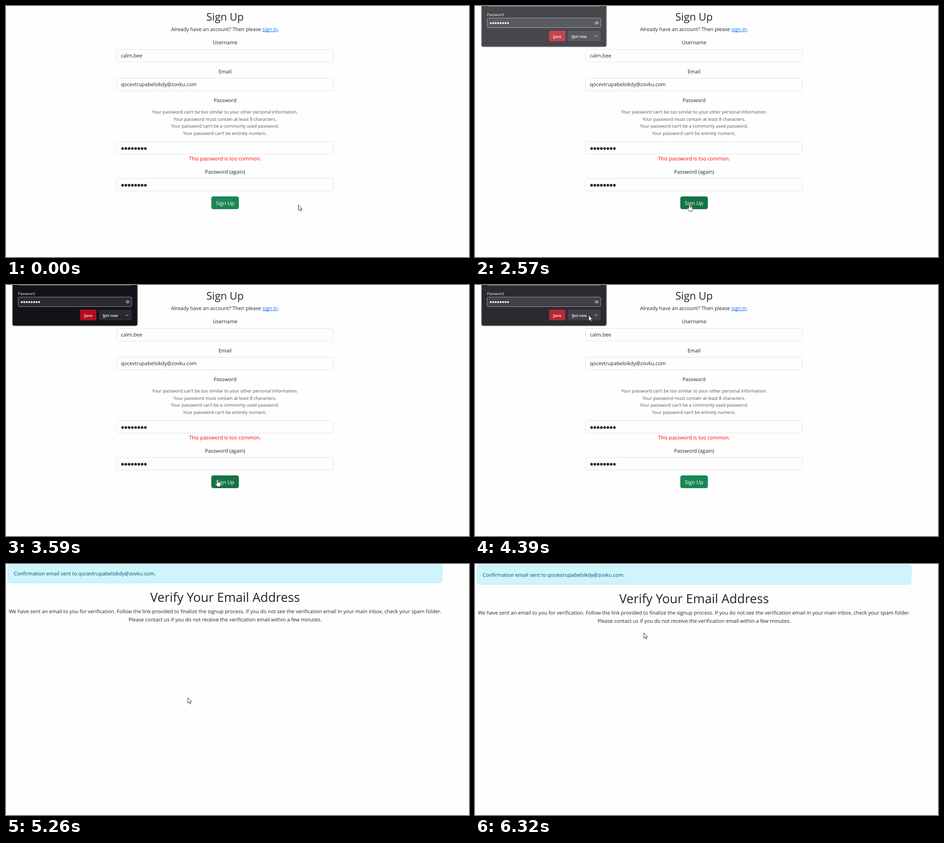
An HTML page with a canvas that plays this animation: 1016x551 px, repeating every 8 s.

```html
<!DOCTYPE html>
<html lang="en">
<head>
<meta charset="utf-8">
<title>Sign Up</title>
<style>
  html, body { margin: 0; width: 100%; height: 100%; overflow: hidden; background: #fefefe; }
  canvas { display: block; }
</style>
</head>
<body>
<canvas id="stage" width="1016" height="551"></canvas>
<script>
const ctx = document.getElementById('stage').getContext('2d');
const LOOP = 8000;
const CENTER = 480.7;
const BODY = 11.17;
const INK = '#212529';
const PAPER = '#fefefe';
const USER = 'calm.bee';
const EMAIL = 'qocevtrupabelsikdy@zovku.com';

// Pointer stops: start time, tip x, tip y, shape.
const POINTER = [
  [0, 641.5, 436.5, 'arrow'],
  [430, 583.5, 444.5, 'arrow'],
  [550, 525.5, 446.5, 'arrow'],
  [690, 513.5, 446.5, 'arrow'],
  [840, 493, 438, 'hand'],
  [960, 476, 435, 'hand'],
  [1080, 470.5, 434.5, 'hand'],
  [3590, 464, 426.5, 'hand'],
  [3720, 302.5, 142.5, 'arrow'],
  [3870, 268.5, 89.5, 'arrow'],
  [3990, 259.5, 76.5, 'arrow'],
  [4140, 249.5, 66.5, 'arrow'],
  [4630, 250.5, 70.5, 'arrow'],
  [4750, 257.5, 84.5, 'arrow'],
  [4870, 286.5, 142.5, 'arrow'],
  [4990, 330.5, 218.5, 'arrow'],
  [5140, 397.5, 292.5, 'arrow'],
  [5260, 399, 293.5, 'arrow'],
  [5810, 430.5, 299.5, 'arrow'],
  [5930, 486.5, 307.5, 'arrow'],
  [6050, 480.5, 309.5, 'arrow'],
  [6200, 351.5, 172.5, 'arrow'],
  [6320, 370.5, 151, 'arrow']
];
const BUTTON_COLOR = [[0, '#198754'], [840, '#177d4e'], [960, '#157347'], [3720, '#177d4e'], [3870, '#198754']];
const PANEL_ALPHA = [[0, 0], [2570, 0.775], [2690, 1], [4390, 0.9], [4510, 0.4], [4630, 0]];

const current = (steps, t) => steps.findLast(step => step[0] <= t);

function text(str, x, y, { size = BODY, color = INK, align = 'center', weight = 400 } = {}) {
  ctx.font = `${weight} ${size}px "Open Sans", "Noto Sans", sans-serif`;
  ctx.textAlign = align;
  ctx.fillStyle = color;
  ctx.fillText(str, x, y);
  return ctx.measureText(str).width;
}

function box(x, y, w, h, r, fill, stroke) {
  ctx.beginPath();
  ctx.roundRect(x, y, w, h, r);
  ctx.fillStyle = fill;
  ctx.fill();
  if (stroke) {
    ctx.strokeStyle = stroke;
    ctx.lineWidth = 1;
    ctx.stroke();
  }
}

function dots(x, y, pitch, radius, color) {
  ctx.fillStyle = color;
  for (let i = 0; i < 8; i++) {
    ctx.beginPath();
    ctx.arc(x + i * pitch, y, radius, 0, Math.PI * 2);
    ctx.fill();
  }
}

const field = y => box(242.5, y, 476, 27.5, 4.5, PAPER, '#dee2e6');

function signInLine(y) {
  const parts = [['Already have an account? Then please ', INK], ['sign in', '#0d6efd'], ['.', INK]];
  ctx.font = `${BODY}px "Open Sans", "Noto Sans", sans-serif`;
  let x = CENTER - ctx.measureText(parts.map(p => p[0]).join('')).width / 2;
  for (const [str, color] of parts) {
    const width = text(str, x, y, { color, align: 'left' });
    if (color !== INK) ctx.fillRect(x, y + 1, width, 1);
    x += width;
  }
}

function signUpPage(t) {
  text('Sign Up', CENTER, 31.8, { size: 23 });
  signInLine(55);
  text('Username', CENTER, 84.4);
  field(95.5);
  text(USER, 252, 113, { align: 'left' });
  text('Email', CENTER, 147.6);
  field(158.5);
  text(EMAIL, 252, 176.2, { align: 'left' });
  text('Password', CENTER, 211);
  [
    'Your password can’t be too similar to your other personal information.',
    'Your password must contain at least 8 characters.',
    'Your password can’t be a commonly used password.',
    'Your password can’t be entirely numeric.'
  ].forEach((line, i) => text(line, CENTER, 236 + i * 15.5, { size: 9.77, color: '#505458' }));
  field(297.5);
  dots(255.8, 312.8, 7.15, 2.9, INK);
  text('This password is too common.', CENTER, 339, { color: '#ff0000' });
  text('Password (again)', CENTER, 368);
  field(378.5);
  dots(255.8, 393.5, 7.15, 2.9, INK);
  box(450.5, 418, 60.5, 28, 4.5, current(BUTTON_COLOR, t)[1]);
  text('Sign Up', CENTER, 436.5, { size: 11.4, color: '#fff' });
}

function line(color, width, ...points) {
  ctx.beginPath();
  points.forEach(([x, y]) => ctx.lineTo(x, y));
  ctx.strokeStyle = color;
  ctx.lineWidth = width;
  ctx.stroke();
}

function eye(x, y, color) {
  ctx.strokeStyle = color;
  ctx.lineWidth = 0.9;
  ctx.beginPath();
  ctx.moveTo(x - 4.5, y);
  ctx.quadraticCurveTo(x, y - 6, x + 4.5, y);
  ctx.quadraticCurveTo(x, y + 6, x - 4.5, y);
  ctx.stroke();
  ctx.beginPath();
  ctx.arc(x, y, 1.5, 0, Math.PI * 2);
  ctx.stroke();
}

function savePanel(alpha) {
  if (!alpha) return;
  const light = '#fbfbfe', control = '#2b2a33', edge = '#8f8f9d';
  const label = { size: 8.2, color: light, align: 'left' };
  const bold = { ...label, weight: 600 };
  ctx.save();
  ctx.shadowColor = 'rgba(0,0,0,.3)';
  ctx.shadowBlur = 3;
  box(14, -20, 274.5, 109.5, 4, '#131218');
  ctx.shadowColor = 'transparent';
  box(14.5, -20, 273.5, 109, 4, '#131218', '#55545d');
  box(26.5, -20, 249.5, 20.5, 3, control, edge);
  text('Password', 26.5, 21.8, label);
  box(26.5, 26.5, 249.5, 21, 3, control, edge);
  dots(34.6, 37.6, 5.4, 2.1, light);
  eye(267, 37, '#d5d5dc');
  box(162.5, 54, 36, 23.5, 3, '#b00e1e');
  text('Save', 171, 69.7, bold);
  line(light, 0.8, [171, 71.5], [175.5, 71.5]);
  box(203.5, 54, 72.5, 23.5, 3, control);
  text('Not now', 212, 69.7, bold);
  line(light, 0.8, [212, 71.5], [218, 71.5]);
  line(light, 1, [263.2, 64.8], [266, 67.6], [268.8, 64.8]);
  // The page is blank behind the panel, so a veil of paper fades it as a whole.
  ctx.globalAlpha = 1 - alpha;
  ctx.fillStyle = PAPER;
  ctx.fillRect(9, 0, 285, 95);
  ctx.restore();
}

function verifyPage(y) {
  box(4.5, 2.5 + y, 952.5, 42, 4.5, '#cff4fc', '#9eeaf9');
  text(`Confirmation email sent to ${EMAIL}.`, 17, 27.8 + y, { color: '#055160', align: 'left' });
  text('Verify Your Email Address', CENTER, 86 + y, { size: 27.7 });
  text('We have sent an email to you for verification. Follow the link provided to finalize the signup process. ' +
    'If you do not see the verification email in your main inbox, check your spam folder.', CENTER, 111 + y);
  text('Please contact us if you do not receive the verification email within a few minutes.', CENTER, 128.8 + y);
}

const SHAPES = {
  arrow: new Path2D('M0 0V12L2.8 9.5L4.9 14L6.6 13.2L4.6 8.9H8.4Z'),
  hand: new Path2D('M-1.4 1Q0 -.9 1.4 1V6Q2.8 4.9 3.8 6.3Q5 5.4 5.8 6.8Q7.2 6.5 7.2 8V11.5Q7 13.5 5.8 14.6V16.4H-1V14.8' +
    'L-4.6 10.2Q-5.3 8.5 -3.8 8.3L-1.4 10.2Z')
};

function pointer(t) {
  const [, x, y, shape] = current(POINTER, t);
  ctx.save();
  ctx.translate(x, y);
  ctx.fillStyle = '#fff';
  ctx.strokeStyle = '#222';
  ctx.lineWidth = 0.9;
  ctx.lineJoin = 'round';
  ctx.fill(SHAPES[shape]);
  ctx.stroke(SHAPES[shape]);
  if (shape === 'hand') {
    line('#222', 0.7, [1.4, 5.5], [1.4, 8]);
    line('#222', 0.7, [3.8, 6.3], [3.8, 8.3]);
    line('#222', 0.7, [5.8, 6.8], [5.8, 8.6]);
  }
  ctx.restore();
}

function render(t) {
  ctx.textRendering = 'geometricPrecision';
  ctx.fillStyle = PAPER;
  ctx.fillRect(0, 0, 1016, 551);
  if (t < 5260) {
    signUpPage(t);
    savePanel(current(PANEL_ALPHA, t)[1]);
  } else {
    verifyPage(t < 5420 ? -3 : 0);
  }
  pointer(t);
}

const start = performance.now();
function tick() {
  render((performance.now() - start) % LOOP);
  requestAnimationFrame(tick);
}
tick();
</script>
</body>
</html>
```
